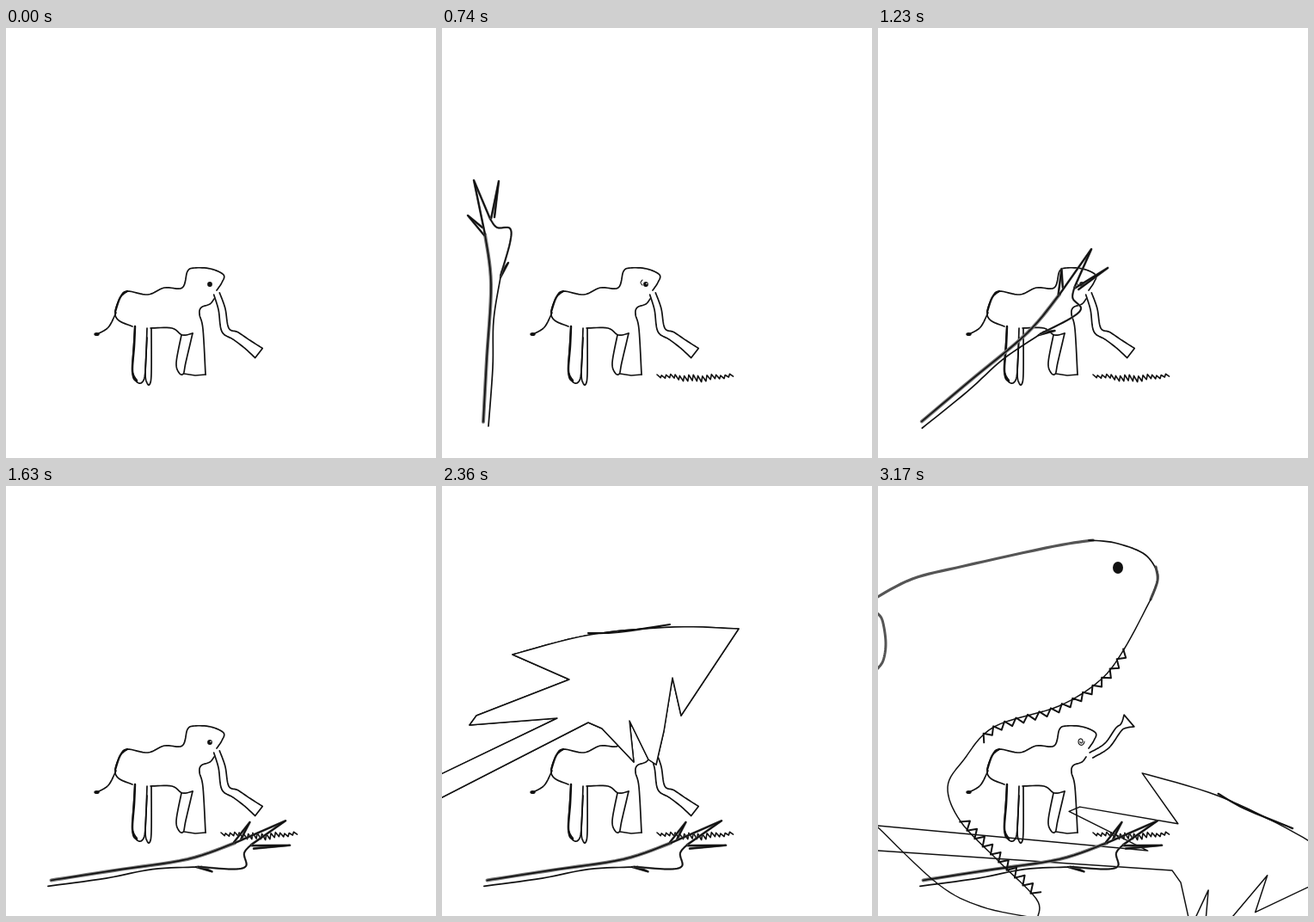
An HTML page with a canvas for the animation above (3250 ms loop, 500 by 500 pixels).

```html
<!DOCTYPE html>
<html lang="en">
<head>
<meta charset="utf-8">
<title>Elephant and falling trees</title>
<style>
html, body { margin: 0; width: 100%; height: 100%; overflow: hidden; background: #fff; }
canvas { display: block; width: 500px; height: 500px; }
</style>
</head>
<body>
<canvas id="stage" width="500" height="500"></canvas>
<script>
const LOOP = 3250, BEAT = 80;
const SPROUT = 580, TREE = 660, TOPPLE = 1070, BLINK = 1630, CRASH = 2040, LANDED = 2840, SHARK = 3170;
const INK = '#111', GRAY = '#777';
const ctx = document.getElementById('stage').getContext('2d');

// Number of beats begun since a moment, from 0 up to count.
const beats = (t, from, count) => Math.max(0, Math.min(count, Math.floor((t - from) / BEAT) + 1));
const dip = (t, from, count) => Math.sin(Math.PI * beats(t, from, count) / count);

function pairs(flat) {
  const out = [];
  for (let i = 0; i < flat.length; i += 2) out.push([flat[i], flat[i + 1]]);
  return out;
}

// Catmull-Rom curve through the points, n samples per span.
function spline(p, n = 8) {
  const at = i => p[Math.max(0, Math.min(p.length - 1, i))];
  const out = [];
  for (let i = 0; i < p.length - 1; i++) {
    const [a, b, c, d] = [at(i - 1), at(i), at(i + 1), at(i + 2)];
    for (let k = 0; k < n; k++) {
      const u = k / n;
      out.push([0, 1].map(j => b[j] + u / 2 * (c[j] - a[j] +
        u * (2 * a[j] - 5 * b[j] + 4 * c[j] - d[j] + u * (3 * b[j] - a[j] - 3 * c[j] + d[j])))));
    }
  }
  return [...out, at(p.length)];
}

function stroke(points, width = 1.7, color = INK) {
  ctx.beginPath();
  for (const [x, y] of points) ctx.lineTo(x, y);
  ctx.lineWidth = width;
  ctx.strokeStyle = color;
  ctx.stroke();
}

const curve = (flat, width, color) => stroke(spline(pairs(flat)), width, color);
const lines = (flat, width, color) => stroke(pairs(flat), width, color);

function dot(x, y, rx, ry = rx, color = INK) {
  ctx.fillStyle = color;
  ctx.beginPath();
  ctx.ellipse(x, y, rx, ry, 0, 0, 7);
  ctx.fill();
}

function turned(x, y, deg, paint) {
  ctx.save();
  ctx.translate(x, y);
  ctx.rotate(deg * Math.PI / 180);
  ctx.translate(-x, -y);
  paint();
  ctx.restore();
}

// Points moved sideways from a line; dist may depend on the index.
function beside(p, dist) {
  return p.map(([x, y], i) => {
    const a = p[Math.max(0, i - 1)], b = p[Math.min(p.length - 1, i + 1)];
    const dx = b[0] - a[0], dy = b[1] - a[1], d = dist(i) / Math.hypot(dx, dy);
    return [x + dy * d, y - dx * d];
  });
}

function leg(x1, y1, x2, y2, foot, width, ground) {
  curve([x1, y1, foot, ground - 14, foot + width * .3, ground - 2, foot + width * .75, ground - 1,
    foot + width, ground - 14, x2, y2]);
}

function trunk(spine, grow, tip) {
  const p = pairs(spine);
  const half = i => i === p.length - 1 ? tip : 3.5 + i * grow;
  const left = beside(p, half), right = beside(p, i => -half(i));
  stroke([...spline(left), ...spline(right).reverse()]);
}

function tail() {
  curve([128, 331, 119, 348, 106, 356]);
  dot(105.5, 356, 3.2, 2);
}

function eye(t) {
  if (t >= LANDED) {
    const swirl = Array.from({ length: 24 }, (_, i) => {
      const a = i * .4, r = 5 - i * .16;
      return [236 + Math.cos(a) * r * .8, 297 + Math.sin(a) * r];
    });
    stroke(swirl, 1.1);
    return;
  }
  dot(237, 298, 2.9);
  if (t >= SPROUT) dot(238, 297.3, .8, .8, '#fff');
  if (t >= SPROUT && t < BLINK) curve([233, 293, 231, 296, 233, 299], 1.1);
}

function elephant(t) {
  const scale = 1 - .053 * (dip(t, 100, 6) + dip(t, BLINK + BEAT, 2));
  ctx.save();
  ctx.translate(0, 412 * (1 - scale));
  ctx.scale(1, scale);

  curve([147, 347, 131, 340, 127, 330, 133, 313, 141, 306, 165, 310, 184, 302, 205, 302,
    211, 283, 219, 279, 238, 280, 253, 287, 251, 296, 245, 305]);
  curve([127, 330, 133, 313, 141, 306], 2.2);
  curve([242, 315, 237, 321, 227, 325, 225, 333, 229, 350, 232, 403]);
  lines([232, 403, 220, 404, 207, 402]);
  curve([168, 349, 193, 349, 205, 357, 217, 355]);

  leg(150, 347, 164, 349, 147, 15, 413);
  leg(164, 360, 169, 349, 162, 7, 415);
  leg(204, 357, 217, 355, 198, 11, 403);
  curve([150, 347, 149, 370, 147, 399, 152, 410], 2.5);

  if (t >= LANDED) trunk([248, 313, 266, 302, 279, 284, 285, 279, 292, 273], 0, 9);
  else trunk([245, 309, 251, 327, 255, 351, 267, 358, 281, 368, 294, 378], .5, 7);

  turned(128, 330, beats(t, TOPPLE, 2) === 1 ? -14 : 0, tail);
  eye(t);
  ctx.restore();
}

function grass() {
  const blades = Array.from({ length: 34 }, (_, i) => {
    const low = i % 2, sag = Math.sin(i / 33 * Math.PI) ** 2;
    return [250 + i * 2.64 + low * 1.5, 403 + sag + low * (3 + sag * 4) + Math.sin(i * 7) * .9];
  });
  stroke(blades, 1.6);
}

function shaded(flat, width) {
  curve(flat, width, GRAY);
  curve(flat, 1.6);
}

function bareTree() {
  shaded([48, 458, 52, 385, 57, 298, 50, 240], 4);
  for (const spike of [
    [49, 241, 30, 218, 47, 232],
    [50, 240, 37, 177, 56, 222],
    [57, 222, 66, 178, 61, 220],
    [68, 290, 77, 273, 69, 284],
  ]) {
    lines(spike, 2.6, '#555');
    lines(spike, 1.7);
  }
  shaded([56, 222, 64, 232, 79, 233, 79, 250, 68, 288], 2.4);
  curve([68, 290, 60, 340, 59, 395, 54, 463]);
}

function bigTree(filled) {
  const branches = [-300, 479, 134, 270, 32, 278, 40, 267, 148, 225, 82, 196];
  const top = spline(pairs([82, 196, 172, 173, 270, 164, 345, 166]));
  const under = [278, 267, 268, 223, 258, 285, 249, 324, 240, 318, 218, 273, 223, 321, 186, 282, 170, 275, -300, 516];
  const outline = [...pairs(branches), ...top, ...pairs(under)];
  stroke(outline, 1.5);
  if (filled) {
    ctx.fillStyle = '#fff';
    ctx.fill();
    stroke(outline, 1.5);
  }
  curve([170, 171, 205, 170, 265, 161], 2.2);
}

// Zigzag along the inner side of a sampled curve.
function teeth(path, step, size) {
  const marks = [path[0]];
  let run = 0;
  for (let i = 1; i < path.length; i++) {
    const [ax, ay] = path[i - 1], [bx, by] = path[i];
    const len = Math.hypot(bx - ax, by - ay);
    for (let d = step - run; d <= len; d += step) {
      marks.push([ax + (bx - ax) * d / len, ay + (by - ay) * d / len]);
    }
    run = (run + len) % step;
  }
  stroke(beside(marks, i => i % 2 ? size : -1), 2);
}

function shark() {
  curve([-4, 131, 40, 108, 100, 93, 205, 70, 250, 63], 3.2, '#555');
  curve([245, 63, 275, 66, 308, 78, 323, 96, 325, 110, 317, 132]);
  curve([323, 94, 325, 110, 317, 132], 3, '#444');
  curve([-2, 147, 5, 156, 9, 182, 6, 203, -2, 214], 3, '#555');

  const jaw = spline(pairs([317, 132, 286, 190, 258, 226, 210, 256, 135, 280, 100, 318,
    81, 350, 96, 390, 140, 436, 184, 480, 186, 501]));
  stroke(jaw, 1.5);
  teeth(jaw.slice(8, 37), 7, 7);
  teeth(jaw.slice(56, 73), 6.5, 9);
  curve([0, 397, 70, 463, 120, 489, 180, 502], 1.4);
  dot(279, 95, 6, 7);
}

function render(t) {
  ctx.fillStyle = '#fff';
  ctx.fillRect(0, 0, 500, 500);
  ctx.lineCap = ctx.lineJoin = 'round';

  const landed = t >= LANDED;
  const swing = beats(t, CRASH, 6) - 5;
  const crown = landed ? 31 : 9.5 * swing + .33 * swing * swing;
  const crash = () => turned(-54, 671, crown, () => bigTree(!landed));

  if (landed) crash();
  elephant(t);
  if (t >= CRASH && !landed) crash();
  if (t >= SPROUT) grass();
  if (t >= TREE) {
    const lean = t < TREE + BEAT ? -2.6 : 15.6 * beats(t, TOPPLE, 5);
    turned(50, 461, lean, bareTree);
  }
  if (t >= SHARK) shark();
}

const start = performance.now();
function tick() {
  render((performance.now() - start) % LOOP);
  requestAnimationFrame(tick);
}
tick();
</script>
</body>
</html>
```
